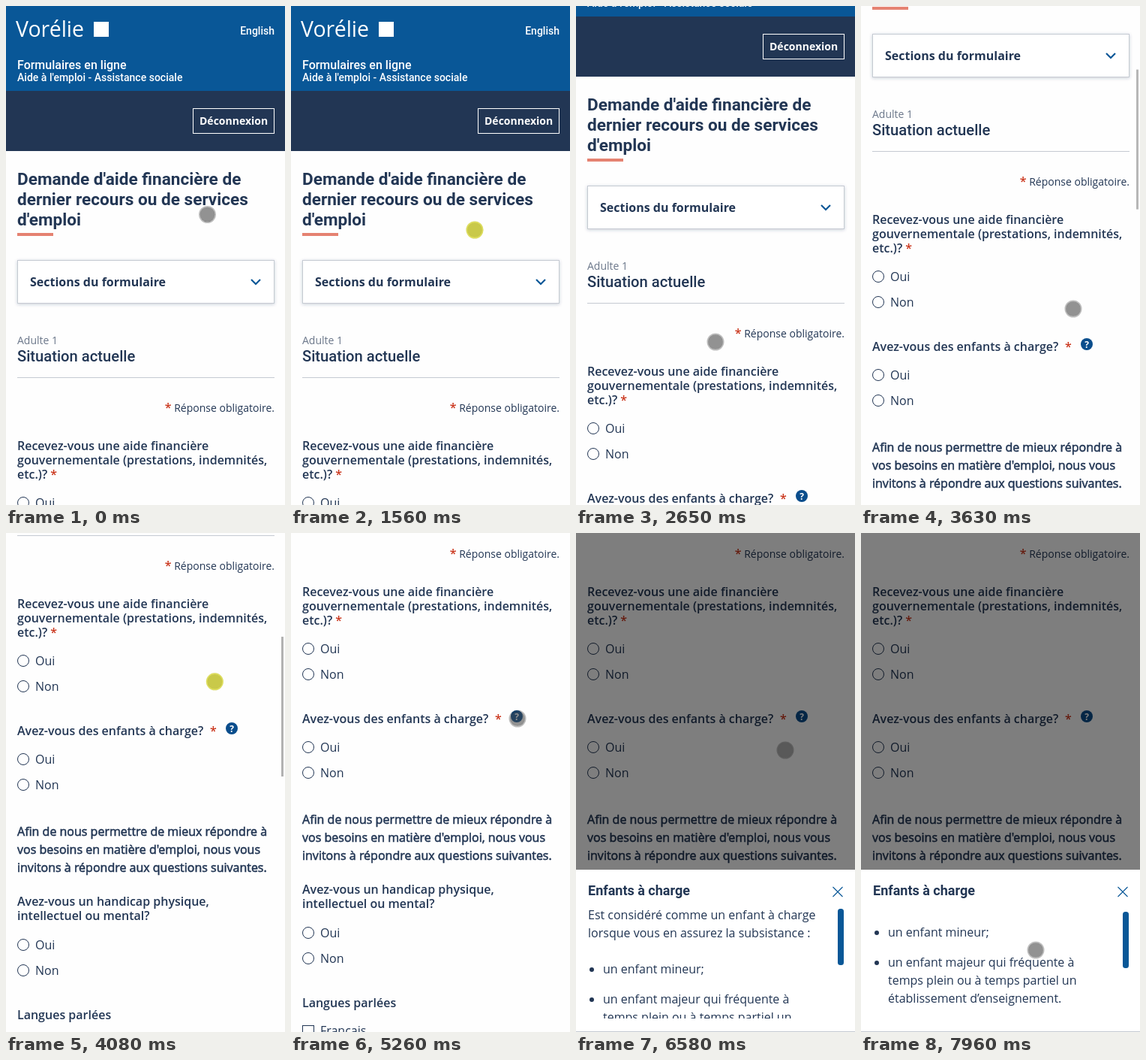
An HTML page that plays this animation: 372 by 664 pixels, repeating every 8 s.

```html
<!DOCTYPE html>
<html lang="fr">
<head>
<meta charset="utf-8">
<style>
html, body { margin: 0; width: 372px; height: 664px; overflow: hidden; }
svg { display: block; font: 16px "Open Sans", sans-serif; fill: #223654; }
.roboto { font-family: Roboto, sans-serif; }
.small { font-size: 14px; }
.header { fill: #fff; font-weight: 500; }
.semi { font-weight: 600; }
.bold { font-weight: 700; }
.white { fill: #fff; }
.muted { fill: #6b778a; }
.title { font-size: 22.6px; }
.subtitle { font-size: 20.2px; font-weight: 500; }
.heading { font-size: 18px; }
.logo { font-size: 28.5px; }
.thick { stroke: #223654; stroke-width: .55px; }
.star { fill: #cb381f; font-size: 16px; font-weight: 600; }
.line { fill: none; stroke: #223654; }
.blue { fill: none; stroke: #095797; }
</style>
</head>
<body>
<svg width="372" height="664" viewBox="0 0 372 664">
  <defs>
    <clipPath id="body"><rect y="496" width="372" height="150"/></clipPath>
    <filter id="shadow" x="-5%" y="-20%" width="110%" height="150%">
      <feDropShadow dx="0" dy="1" stdDeviation="2" flood-color="#223654" flood-opacity=".24"/>
    </filter>
  </defs>
  <rect width="372" height="664" fill="#fefefe"/>

  <g id="page">
    <rect width="372" height="113" fill="#095797"/>
    <rect y="113" width="372" height="80" fill="#223654"/>
    <text x="13" y="40.5" class="logo white">Vorélie</text>
    <rect x="117" y="21" width="20" height="20" fill="#fff"/>
    <text x="358" y="38" text-anchor="end" class="roboto small header">English</text>
    <text x="15" y="84" class="roboto header">Formulaires en ligne</text>
    <text x="15" y="100" class="roboto small header">Aide à l'emploi - Assistance sociale</text>
    <rect x="249.5" y="136.5" width="108" height="33" fill="none" stroke="#fff"/>
    <text x="258" y="158" class="small bold white">Déconnexion</text>

    <text x="15" y="238" class="roboto bold title" data-leading="27">Demande d'aide financière de
dernier recours ou de services
d'emploi</text>
    <rect x="15" y="302" width="48" height="4" fill="#e58271"/>
    <rect x="15.5" y="338.5" width="342" height="57" fill="#fff" stroke="#c5cad2" filter="url(#shadow)"/>
    <text x="32" y="373" class="bold">Sections du formulaire</text>
    <path d="M327 364l6 6 6-6" class="blue" stroke-width="2.2"/>

    <text x="15" y="450" class="small muted">Adulte 1</text>
    <text x="15" y="473" class="roboto subtitle">Situation actuelle</text>
    <path d="M15 494.5h343" stroke="#c5cad2"/>
    <text x="358" y="540" text-anchor="end" class="small"><tspan class="star">*</tspan> Réponse obligatoire.</text>

    <text x="15" y="591" class="semi" data-leading="19">Recevez-vous une aide financière
gouvernementale (prestations, indemnités,
etc.)? <tspan class="star">*</tspan></text>
    <text x="15" y="760" class="semi">Avez-vous des enfants à charge? <tspan class="star" x="272">*</tspan></text>
    <circle cx="301" cy="751" r="8" fill="#0a4d8c"/>
    <text x="301" y="755.5" text-anchor="middle" class="white bold" font-size="12">?</text>
    <text x="15" y="893.5" class="thick" data-leading="24">Afin de nous permettre de mieux répondre à
vos besoins en matière d'emploi, nous vous
invitons à répondre aux questions suivantes.</text>
    <text x="15" y="987" class="semi" data-leading="19">Avez-vous un handicap physique,
intellectuel ou mental?</text>
    <text x="15" y="1138" class="semi">Langues parlées</text>
    <rect x="15.5" y="1162.5" width="15" height="15" class="line"/>
    <text x="39" y="1175">Français</text>
  </g>

  <path id="bar" d="M367 0h3v186h-3z" fill="#000"/>
  <rect id="shade" width="372" height="664" fill="#000"/>

  <g id="modal">
    <rect y="448" width="372" height="216" fill="#fff"/>
    <path d="M0 663.5h372" stroke="#c5cad2"/>
    <text x="16" y="482" class="roboto bold heading">Enfants à charge</text>
    <path d="M342.5 471l13 13m0-13l-13 13" class="blue" stroke-width="1.1"/>
    <g clip-path="url(#body)">
      <g id="list">
        <text x="16" y="514" data-leading="24">Est considéré comme un enfant à charge
lorsque vous en assurez la subsistance :</text>
        <circle cx="21" cy="581" r="3"/>
        <text x="36" y="586">un enfant mineur;</text>
        <circle cx="21" cy="621" r="3"/>
        <text x="36" y="626" data-leading="24">un enfant majeur qui fréquente à
temps plein ou à temps partiel un
établissement d’enseignement.</text>
      </g>
    </g>
    <rect id="thumb" x="349" y="500" width="8" height="75" rx="3.5" fill="#095797"/>
  </g>

  <g id="cursor">
    <circle r="10.5" fill="none" stroke="#000" stroke-opacity=".25" stroke-width="2"/>
    <circle r="9.8" fill="#3c3c3c" fill-opacity=".56"/>
    <circle id="press" r="11.5" fill="#ff0" fill-opacity=".5"/>
  </g>
</svg>
<script>
const $ = id => document.getElementById(id);
const clamp = value => Math.min(1, Math.max(0, value));
const easeOut = p => 1 - (1 - p) ** 2;
const smooth = p => p * p * (3 - 2 * p);

// Break multi-line text into evenly spaced lines.
for (const block of document.querySelectorAll('[data-leading]')) {
  const x = block.getAttribute('x'), leading = block.dataset.leading;
  block.innerHTML = block.innerHTML.split('\n')
    .map((line, i) => `<tspan x="${x}" dy="${i && leading}">${line}</tspan>`).join('');
}

for (const top of [661, 792, 1039]) {
  ['Oui', 'Non'].forEach((label, i) => {
    const y = top + 34 * i;
    $('page').insertAdjacentHTML('beforeend',
      `<circle cx="23" cy="${y}" r="7.5" class="line"/><text x="39" y="${y + 6}">${label}</text>`);
  });
}

// Each step brings the pointer to (x, y); a drag also scrolls the named part.
const step = (start, end, x, y, drag) => ({ start, end, x, y, drag });
const steps = [
  step(1270, 1500, 245, 298),
  step(1570, 2000, 238, 184, 'page'),
  step(2080, 2640, 186, 447),
  step(2700, 3220, 232, 230, 'page'),
  step(3220, 3625, 283, 403),
  step(3700, 4220, 278, 182, 'page'),
  step(4550, 5260, 302, 247),
  step(6530, 6575, 279, 289),
  step(6640, 7310, 233, 612),
  step(7500, 7900, 233, 555, 'list')
];
const slop = { page: 15, list: 8 };
const tap = 5540;

const move = (id, x, y) => $(id).setAttribute('transform', `translate(${x} ${y})`);
const fade = (id, opacity) => $(id).setAttribute('opacity', opacity);

function draw(now) {
  const t = now % 8000;
  const scroll = { page: 0, list: 0 };
  let x = 268.5, y = 277.5, bar = 0;
  let pressed = t >= tap && t < tap + 100;

  for (const s of steps) {
    const progress = clamp((t - s.start) / (s.end - s.start));
    const eased = s.drag ? easeOut(progress) : smooth(progress);
    const dy = (s.y - y) * eased;
    x += (s.x - x) * eased;
    y += dy;
    if (s.drag) {
      scroll[s.drag] += Math.max(0, -dy - slop[s.drag]);
      pressed ||= t >= s.start - 45 && t < s.end;
    }
    if (s.drag === 'page' && progress > 0) bar = clamp((s.end + 600 - t) / 200);
    if (progress < 1) break;
  }

  const open = easeOut(clamp((t - tap - 80) / 430));
  move('page', 0, -Math.round(scroll.page));
  move('bar', 0, scroll.page * .281);
  fade('bar', bar * .3);
  fade('shade', open * .5);
  move('modal', 0, 216 * (1 - open));
  move('list', 0, -Math.round(scroll.list));
  move('thumb', 0, scroll.list / 12);
  move('cursor', x, y);
  fade('press', +pressed);
  requestAnimationFrame(draw);
}
requestAnimationFrame(draw);
</script>
</body>
</html>
```
